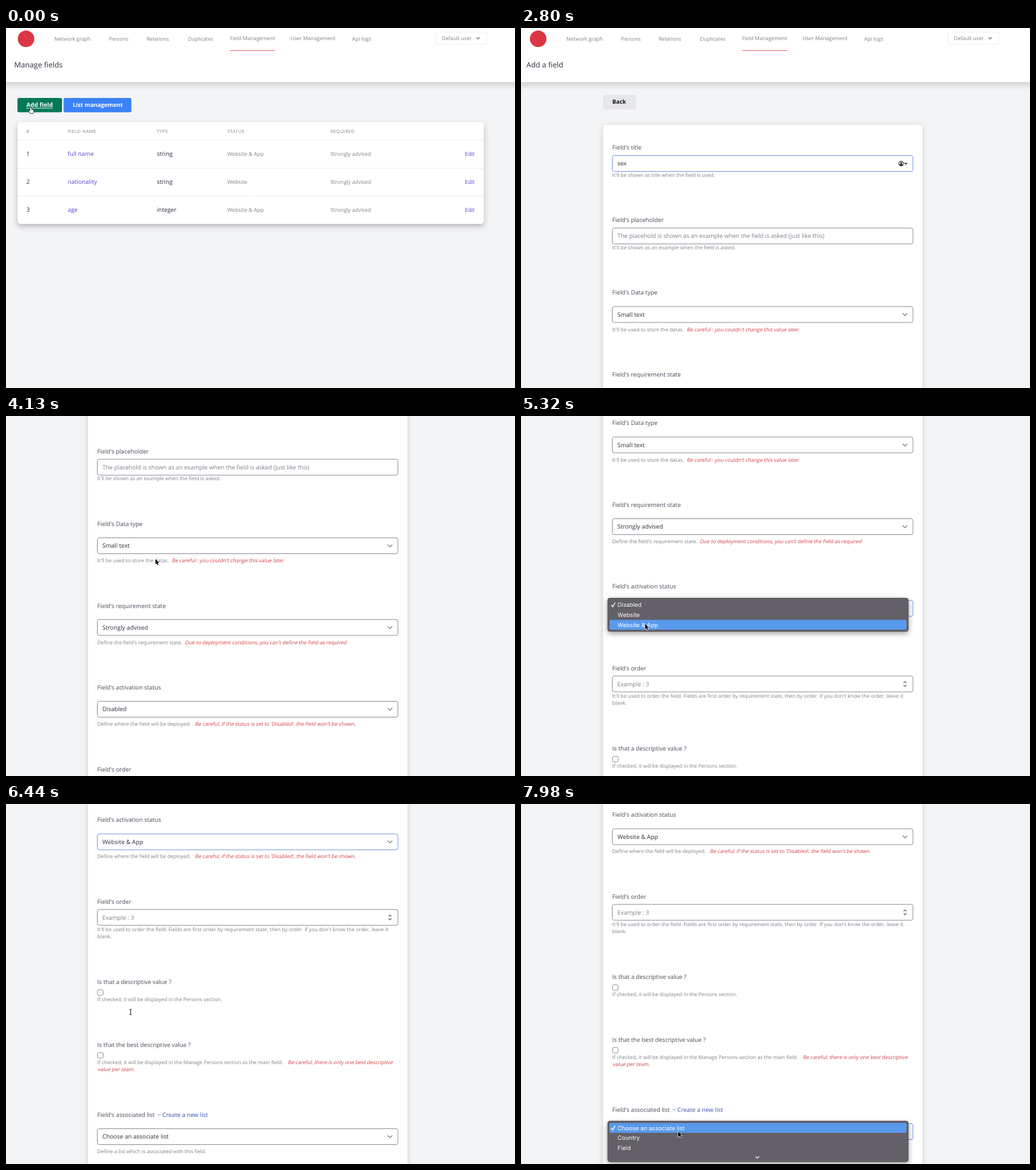
An HTML page with a canvas for the animation above (8 s loop, 800 by 566 pixels).

```html
<!DOCTYPE html>
<html lang="en">
<head>
<meta charset="utf-8">
<title>Field management</title>
<style>
  html, body { margin: 0; width: 100%; height: 100%; overflow: hidden; background: #f3f4f6; }
  canvas { display: block; width: 100vw; height: 100vh; }
</style>
</head>
<body>
<canvas id="stage"></canvas>
<script>
const W = 800, H = 566, LOOP = 8000;
const canvas = document.getElementById('stage');
const ctx = canvas.getContext('2d');
const dpr = window.devicePixelRatio || 1;
canvas.width = W * dpr;
canvas.height = H * dpr;

const SANS = '"Open Sans", "Noto Sans", sans-serif';
const SYSTEM = 'Inter, Roboto, sans-serif';
const INK = '#2b303b', LABEL = '#464b57', MUTED = '#7b808b', RED = '#d43b3f';
const LINK = '#5a45cf', BLUE = '#7599e6', BORDER = '#8d919b';

const PAGE_CHANGE = 630, TITLE_FOCUS = 1260, HIDE_CURSOR = 1610, SHOW_CURSOR = 3100;
const STATUS_OPEN = 4970, STATUS_PICK = 5530, LIST_OPEN = 7630;
const KEYS = [1680, 1820, 2030];

const POINTER = [
  [0, 38, 125], [700, 38, 125], [1190, 238, 212], [3150, 238, 212], [3400, 238, 221],
  [4130, 235, 225], [4660, 235, 225], [4900, 196, 300], [5040, 196, 300], [5270, 195, 327],
  [6860, 195, 327], [7420, 247, 515], [LOOP, 247, 515]
];
const SCROLL = [[0, 0], [3150, 0], [3430, 72], [4130, 246], [4760, 405], [LOOP, 405]];

const clamp = v => Math.min(1, Math.max(0, v));
const smooth = u => u * u * (3 - 2 * u);

function track(keys, t, ease = u => u) {
  const i = Math.max(1, keys.findIndex(k => k[0] > t));
  const [a, b] = [keys[i - 1], keys[i]];
  const u = ease((t - a[0]) / (b[0] - a[0]));
  return a.slice(1).map((v, j) => v + (b[j + 1] - v) * u);
}

// Scroll lands on half pixels, like the layout itself
function scrollAt(t) {
  const flick = 1 - (1 - clamp((t - 5880) / 820)) ** 3;
  return Math.round(2 * (track(SCROLL, t)[0] + 251 * flick)) / 2;
}

// y is the visual middle of the line of text
function text(str, x, y, size = 9.35, color = LABEL, opt = {}) {
  ctx.save();
  ctx.font = `${opt.weight || 400} ${size}px ${opt.family || SANS}`;
  ctx.letterSpacing = (opt.spacing || 0) + 'px';
  ctx.textRendering = 'geometricPrecision';
  ctx.fillStyle = color;
  ctx.translate(x, y + size * 0.36);
  if (opt.slant) ctx.transform(1, 0, -0.18, 1, 0, 0);
  ctx.fillText(str, 0, 0);
  const width = ctx.measureText(str).width;
  ctx.restore();
  return width;
}

function box(x, y, w, h, r, fill, stroke, lineWidth = 1) {
  ctx.beginPath();
  ctx.roundRect(x, y, w, h, r);
  if (fill) { ctx.fillStyle = fill; ctx.fill(); }
  if (stroke) { ctx.strokeStyle = stroke; ctx.lineWidth = lineWidth; ctx.stroke(); }
}

function line(points, color, width = 1) {
  ctx.beginPath();
  points.forEach(([x, y]) => ctx.lineTo(x, y));
  ctx.strokeStyle = color;
  ctx.lineWidth = width;
  ctx.stroke();
}

function chevron(x, y, size, color, width = 1.1) {
  line([[x - size, y - size / 2], [x, y + size / 2], [x + size, y - size / 2]], color, width);
}

function shadowBox(x, y, w, h, r, fill, blur, dy, alpha) {
  ctx.save();
  ctx.shadowColor = `rgba(0,0,0,${alpha})`;
  ctx.shadowBlur = blur;
  ctx.shadowOffsetY = dy;
  box(x, y, w, h, r, fill);
  ctx.restore();
}

function header(title, dx) {
  const shade = ctx.createLinearGradient(0, 85, 0, 97);
  shade.addColorStop(0, '#d3d4d6');
  shade.addColorStop(0.6, '#e6e7e9');
  shade.addColorStop(1, '#f3f4f6');
  ctx.fillStyle = shade;
  ctx.fillRect(0, 85, W, 12);
  ctx.fillStyle = '#fff';
  ctx.fillRect(0, 0, W, 85);

  ctx.save();
  ctx.translate(dx, 0);
  ctx.beginPath();
  ctx.arc(31.5, 17, 13, 0, 7);
  ctx.fillStyle = '#dc3545';
  ctx.fill();
  [['Network graph', 76, 17], ['Persons', 162, 17], ['Relations', 221, 17], ['Duplicates', 286, 17],
   ['Field Management', 352, 16], ['User Management', 447, 16], ['Api logs', 544, 17]]
    .forEach(([name, x, y]) => text(name, x, y, 8.2, MUTED));
  line([[352, 35.5], [423, 35.5]], '#e8656b', 1);
  box(675.5, 6.5, 80, 19, 3, '#fff', '#eceef0');
  text('Default user', 685, 16, 8.2, MUTED);
  chevron(742, 16, 2.3, '#555a65', 1.2);
  text(title, 13, 58, 11.7, INK, { weight: 500 });
  ctx.restore();
}

function tablePage() {
  header('Manage fields', 0);
  box(18, 110, 70, 22.5, 2.5, '#047857');
  const width = text('Add field', 32, 121, 9.4, '#fff', { weight: 700 });
  line([[32, 126], [32 + width, 126]], '#fff', 0.9);
  box(90.5, 110, 106.5, 22.5, 2.5, '#3b82f6');
  text('List management', 105, 121, 9, '#fff', { weight: 700 });

  shadowBox(18, 148, 733, 160, 5, '#fff', 8, 4, 0.24);
  [['#', 32], ['FIELD NAME', 97], ['TYPE', 237], ['STATUS', 348], ['REQUIRED', 510]]
    .forEach(([name, x]) => text(name, x, 162, 7, MUTED, { spacing: 0.5 }));
  [['full name', 'string', 'Website & App'], ['nationality', 'string', 'Website'],
   ['age', 'integer', 'Website & App']].forEach(([name, type, status], i) => {
    const y = 198 + 44 * i;
    line([[18, y - 21.5], [751, y - 21.5]], '#eaebee');
    text(String(i + 1), 32, y, 9.4, INK);
    text(name, 97, y, 9.4, LINK);
    text(type, 237, y, 9.4, INK);
    text(status, 348, y, 8.35, MUTED);
    text('Strongly advised', 510, y, 8.35, MUTED);
    text('Edit', 721.5, y, 8.5, LINK);
  });
}

function control(y, focused) {
  box(143.5, y - 12.5, 472.5, 25, 3, '#fff', focused ? BLUE : BORDER);
}

function select(y, value, focused) {
  control(y, focused);
  text(value, 151.5, y, 9.4, INK);
  chevron(603.5, y, 3.6, '#60656f');
}

const help = (str, y) => text(str, 143.5, y, 8, MUTED);
const warn = (str, x, y) => text(str, x, y, 8.05, RED, { slant: true });
const checkbox = y => box(143.8, y - 4.5, 9, 9, 2.5, '#fff', BORDER);

function autofillIcon(y) {
  ctx.beginPath();
  ctx.arc(597.5, y, 3.7, 0, 7);
  ctx.strokeStyle = ctx.fillStyle = '#16181c';
  ctx.lineWidth = 1;
  ctx.stroke();
  ctx.beginPath();
  ctx.arc(597.5, y - 0.8, 1.5, 0, 7);
  ctx.fill();
  ctx.beginPath();
  ctx.ellipse(597.5, y + 2.4, 2.5, 1.3, 0, 0, 7);
  ctx.fill();
  chevron(604.8, y, 2, '#16181c', 1.2);
}

function formPage(t) {
  const titleFocus = t >= TITLE_FOCUS && t < STATUS_OPEN;
  const statusFocus = t >= STATUS_OPEN && t < LIST_OPEN;
  const typed = KEYS.filter(k => k <= t).length;

  header('Add a field', -4.5);
  box(129, 105, 52, 22.5, 2, '#e5e7eb');
  text('Back', 143.5, 116, 9, '#15171c', { weight: 700 });
  shadowBox(129, 152, 502, 1300, 5, '#fff', 9, 2, 0.17);

  text("Field's title", 143.5, 188);
  control(213, titleFocus);
  const width = text('sex'.slice(0, typed), 151.5, 213, 9.4, INK);
  if (titleFocus) {
    autofillIcon(213);
    const since = t - (KEYS[typed - 1] || TITLE_FOCUS);
    if (Math.floor(since / 500) % 2 === 0) {
      const x = 152 + width;
      line([[x, 207], [x, 219.5]], '#22252c', 0.9);
    }
  }
  help("It'll be shown as title when the field is used.", 231);

  text("Field's placeholder", 143.5, 302);
  control(327);
  text('The placehold is shown as an example when the field is asked (just like this)', 151.5, 327, 9.3, MUTED);
  help("It'll be shown as an example when the field is asked.", 345);

  text("Field's Data type", 143.5, 416);
  select(450.5, 'Small text');
  help("It'll be used to store the datas.", 474);
  warn("Be careful : you couldn't change this value later", 260.5, 474);

  text("Field's requirement state", 143.5, 545);
  select(579, 'Strongly advised');
  help("Define the field's requirement state.", 602.5);
  warn("Due to deployment conditions, you can't define the field as required", 281, 602.5);

  text("Field's activation status", 143.5, 673);
  select(707.5, t < STATUS_PICK ? 'Disabled' : 'Website & App', statusFocus);
  help('Define where the field will be deployed.', 730.5);
  warn("Be careful, if the status is set to 'Disabled', the field won't be shown.", 297, 730.5);

  text("Field's order", 143.5, 801.7);
  control(826.3);
  text('Example : 3', 151.5, 826.3, 9.3, MUTED);
  chevron(603.5, 829, 2.2, '#555a65');
  chevron(603.5, 823.6, -2.2, '#555a65');
  help("It'll be used to order the field. Fields are first order by requirement state, then by order. If you don't know the order, leave it", 844.7);
  help('blank.', 856.5);

  text('Is that a descriptive value ?', 143.5, 927.7);
  checkbox(944.6);
  help('If checked, it will be displayed in the Persons section.', 955.2);

  text('Is that the best descriptive value ?', 143.5, 1026.3);
  checkbox(1043.2);
  help('If checked, it will be displayed in the Manage Persons section as the main field.', 1053.8);
  warn('Be careful, there is only one best descriptive', 443, 1053.8);
  warn('value per team.', 144, 1065.5);

  text("Field's associated list", 143.5, 1136.8);
  text('~ Create a new list', 238, 1136.8, 9.35, '#3550ad');
  select(1171, 'Choose an associate list', t >= LIST_OPEN);
  help('Define a list which is associated with this field.', 1194.5);
}

function menu(top, height, items, pointerY) {
  const rowHeight = 15.6;
  const active = Math.min(items.length - 1, Math.max(0, Math.floor((pointerY - top - 3) / rowHeight)));
  shadowBox(136, top, 473, height, 4, '#636067', 9, 3, 0.38);
  box(136.4, top + 0.4, 472.2, height - 0.8, 4, null, '#56535b', 0.8);
  items.forEach((item, i) => {
    const y = top + 11 + rowHeight * i;
    if (i === active) box(139, y - 7.8, 467, 15.6, 2, '#599aec');
    text(item, 151.8, y, 9.2, '#fff', { family: SYSTEM });
  });
  line([[142, top + 11.2], [144, top + 14], [148, top + 7.6]], '#fff', 1.3);
}

function polygon(points, fill, stroke, width) {
  ctx.beginPath();
  points.forEach(([x, y]) => ctx.lineTo(x, y));
  ctx.closePath();
  ctx.lineJoin = 'round';
  ctx.strokeStyle = stroke;
  ctx.lineWidth = width;
  ctx.stroke();
  ctx.fillStyle = fill;
  ctx.fill();
}

function cursorKind(t) {
  if (t < PAGE_CHANGE) return 'hand';
  if (t >= HIDE_CURSOR && t < SHOW_CURSOR) return 'none';
  if ((t > 1130 && t < 3250) || (t > 6200 && t < 6900)) return 'beam';
  return 'arrow';
}

function cursor(t, x, y) {
  const kind = cursorKind(t);
  ctx.save();
  ctx.translate(x, y);
  if (kind === 'arrow') {
    polygon([[0, 0], [0, 8.2], [1.9, 6.6], [3.2, 9.6], [4.7, 9], [3.4, 6], [5.8, 5.8]], '#000', '#fff', 1.2);
  } else if (kind === 'beam') {
    line([[0.8, -4], [0.8, 4]], '#111', 1);
    line([[-1.2, -4.5], [0.8, -3.5], [2.8, -4.5]], '#111', 0.9);
    line([[-1.2, 4.5], [0.8, 3.5], [2.8, 4.5]], '#111', 0.9);
  } else if (kind === 'hand') {
    polygon([[0, 0], [1.4, 0], [2, 3.4], [4.4, 3.6], [5.4, 4.6], [5.2, 7], [4.3, 9],
             [0.6, 9], [-2.4, 5.4], [-1.7, 4.6], [0, 6]], '#fff', '#111', 1.3);
  }
  ctx.restore();
}

function draw(t) {
  ctx.setTransform(dpr, 0, 0, dpr, 0, 0);
  ctx.fillStyle = '#f3f4f6';
  ctx.fillRect(0, 0, W, H);
  const [x, y] = track(POINTER, t, smooth);
  if (t < PAGE_CHANGE) {
    tablePage();
  } else {
    ctx.save();
    ctx.translate(0, -scrollAt(t));
    formPage(t);
    ctx.restore();
    if (t >= STATUS_OPEN && t < STATUS_PICK) {
      menu(286, 53, ['Disabled', 'Website', 'Website & App'], y);
    }
    if (t >= LIST_OPEN) {
      menu(498.3, 64.5, ['Choose an associate list', 'Country', 'Field'], y);
      chevron(371.5, 555.5, 2.8, '#fff', 1.3);
    }
  }
  cursor(t, x, y);
}

const start = performance.now();
function frame() {
  draw((performance.now() - start) % LOOP);
  requestAnimationFrame(frame);
}
frame();
</script>
</body>
</html>
```
